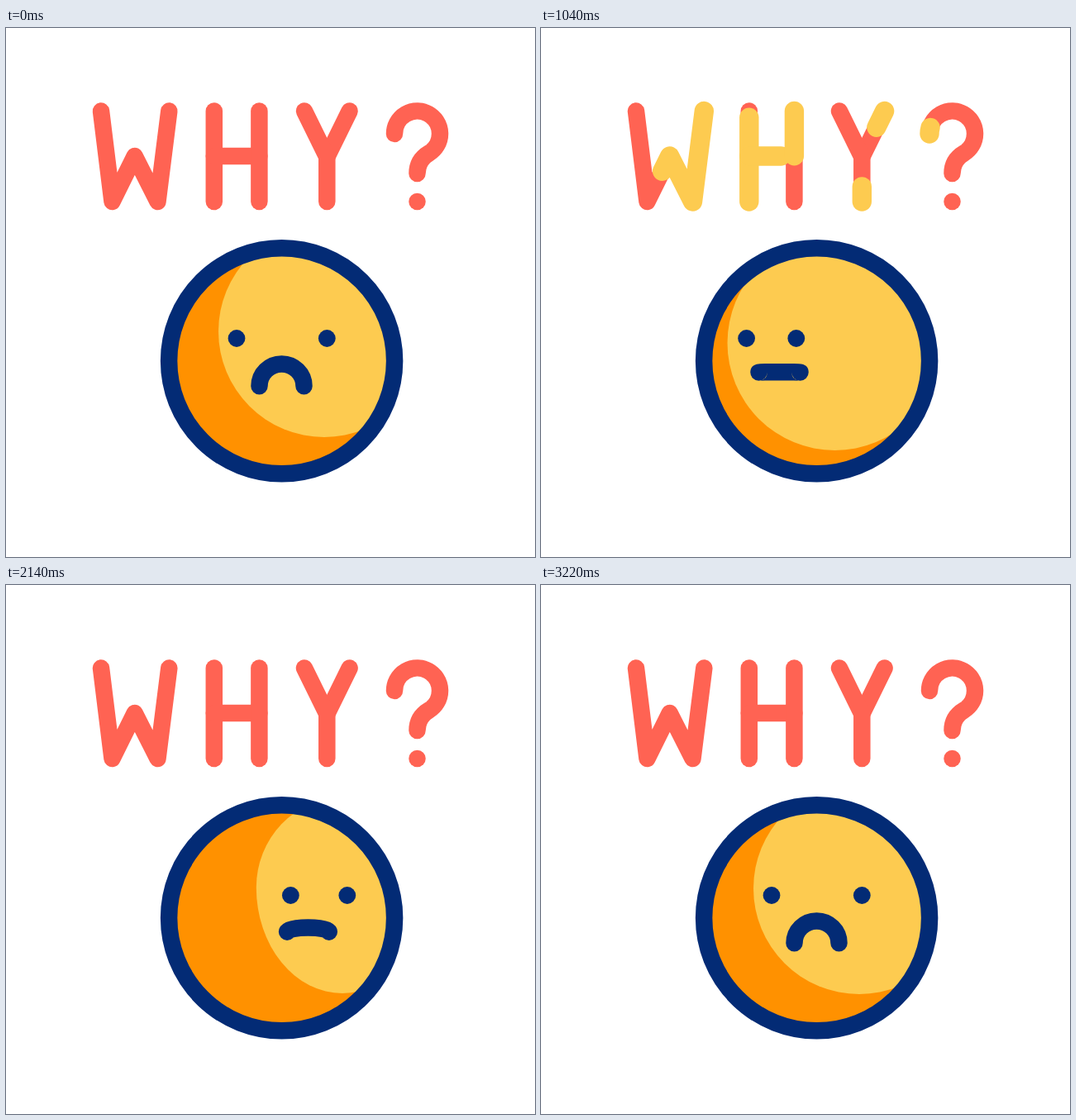
These frames come from a looping animation (640x640 px, 3.6 s). An HTML page:

```html
<!DOCTYPE html>
<html lang="en">
<head>
<meta charset="utf-8">
<title>Why?</title>
<style>
  html, body { margin: 0; width: 100%; height: 100%; overflow: hidden; background: #fff; }
  svg { display: block; width: 100vw; height: 100vh; }
  path { fill: none; stroke-linecap: round; stroke-linejoin: round; }
  #base path { stroke: #ff6353; stroke-width: 20.5; }
  #glow path { stroke: #fdcb50; stroke-width: 23.4; }
  #face circle, #mouth { stroke-width: 20.5; }
  #mouth { stroke: #032b75; }
  #light { fill: #fdcb50; }
</style>
</head>
<body>
<svg viewBox="0 0 640 640">
  <clipPath id="disc"><circle cx="333.6" cy="402.8" r="130"/></clipPath>
  <g id="base"></g>
  <g id="glow"></g>
  <g id="face">
    <circle cx="333.6" cy="402.8" r="130" fill="#ff9100"/>
    <path id="light" clip-path="url(#disc)"/>
    <circle cx="333.6" cy="402.8" r="136.5" fill="none" stroke="#032b75"/>
  </g>
  <g id="features" fill="#032b75">
    <circle id="eyeL" cy="375.5" r="10.4"/>
    <circle id="eyeR" cy="375.5" r="10.4"/>
    <path id="mouth"/>
  </g>
</svg>
<script>
const LOOP = 3600, DRAW = 463, HOLD = 415;
const $ = id => document.getElementById(id);

// Each stroke: path, start of its sweep, delay of the erase, sweep duration
const strokes = [
  ['M115 100.5L128.5 210L155.7 155L183.5 210L197.3 100.5', 478, 350],
  ['M251.8 210V100.5', 653],
  ['M251.8 155H306.4', 745],
  ['M306.4 100.5V210', 811],
  ['M415.6 100.5L388.3 156', 855],
  ['M388.3 210V156L361 100.5', 925],
  ['M470 128A27.5 27.5 0 1 1 512 151.3Q497.5 160 497.5 176', 976],
  ['M497.5 210h.01', 1400, 480, 20]
].map(([d, start, hold = HOLD, time = DRAW]) => {
  const add = group => {
    const p = document.createElementNS('http://www.w3.org/2000/svg', 'path');
    p.setAttribute('d', d);
    return $(group).appendChild(p);
  };
  add('base');
  const el = add('glow');
  return { el, start, hold, time, len: el.getTotalLength() };
});

// Features: left eye, right eye, mouth x, half width, end y, height
const look = {
  rest: [279, 388.3, 333.5, 27, 433.3, 26.8],
  left: [248.6, 308.8, 288.5, 25, 416.6, 0.4],
  right: [359, 418.3, 372.6, 25, 416.6, 0.4]
};
// Lit area: centre x, centre y, x radius, upper and lower y radius
const lit = {
  rest: [385, 367, 128, 128, 128],
  left: [355.5, 381, 130, 130, 130],
  right: [409, 366, 102, 107, 128]
};
const moves = [['left', 270], ['right', 1185], ['rest', 1980]];

const ease = (t, start, time) => {
  const u = Math.min(1, Math.max(0, (t - start) / time));
  return u * u * (3 - 2 * u);
};

function pose(set, t, delay, time) {
  let now = set.rest;
  for (const [name, start] of moves) {
    const p = ease(t, start + delay, time);
    now = now.map((v, i) => v + (set[name][i] - v) * p);
  }
  return now;
}

function render(t) {
  for (const { el, start, hold, time, len } of strokes) {
    const head = ease(t, start, time), tail = ease(t, start + hold, time);
    el.style.display = head > 0 && tail < 1 ? '' : 'none';
    el.setAttribute('stroke-dasharray', `${(head - tail) * len} ${len * 2 + 50}`);
    el.setAttribute('stroke-dashoffset', -tail * len);
  }

  const [cx, cy, rx, up, down] = pose(lit, t, 70, 510);
  $('light').setAttribute('d',
    `M${cx - rx} ${cy}A${rx} ${up} 0 0 1 ${cx + rx} ${cy}A${rx} ${down} 0 0 1 ${cx - rx} ${cy}`);

  const [l, r, x, w, y, h] = pose(look, t, 0, 590);
  $('eyeL').setAttribute('cx', l);
  $('eyeR').setAttribute('cx', r);
  $('mouth').setAttribute('d', `M${x - w} ${y}A${w} ${h} 0 0 1 ${x + w} ${y}`);

  const lift = 11 * (ease(t, 2600, 310) - ease(t, 2910, 310));
  $('features').setAttribute('transform', `translate(0 ${-lift})`);
}

const begin = performance.now();
function tick() {
  render((performance.now() - begin) % LOOP);
  requestAnimationFrame(tick);
}
tick();
</script>
</body>
</html>
```
